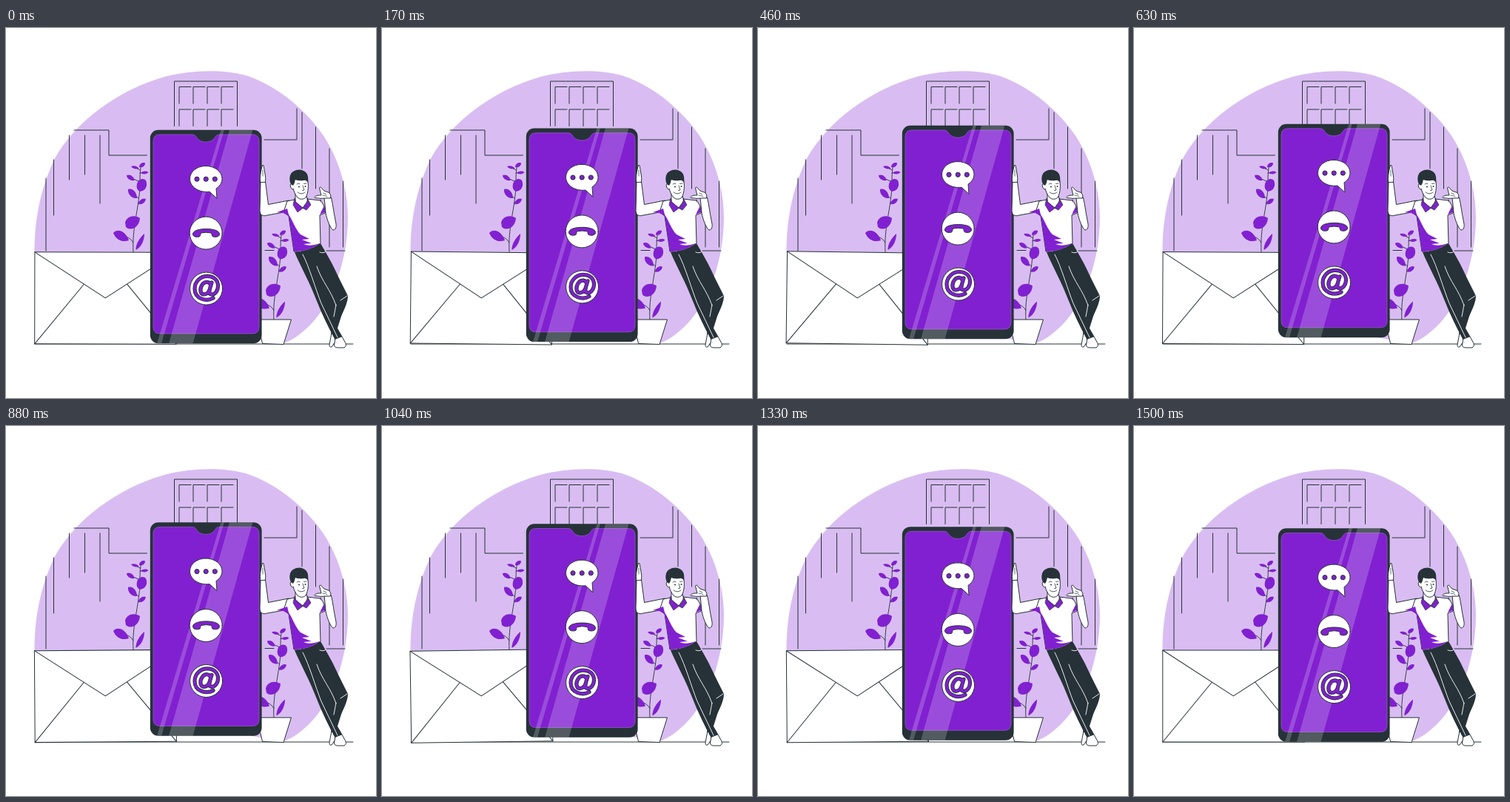
Recreate the animation shown at these times as an HTML page. Size 500x500 px, loop 1540 ms.

```html
<!DOCTYPE html>
<html lang="en">
<head>
<meta charset="utf-8">
<title>Contact us</title>
<style>
  html, body { margin: 0; width: 100%; height: 100%; overflow: hidden; background: #fff; }
  svg { display: block; width: 100vw; height: 100vh; }
  .ln { fill: none; stroke: #263238; stroke-linecap: round; stroke-linejoin: round; }
  .wh { fill: #fff; stroke: #263238; stroke-linecap: round; stroke-linejoin: round; }
  .pu { fill: #8120d0; }
  .pl { fill: #8120d0; stroke: #263238; stroke-linejoin: round; }
  .dk { fill: #263238; }
  .cr { fill: none; stroke: #fff; stroke-width: .9; stroke-linecap: round; }
</style>
</head>
<body>
<svg viewBox="0 0 500 500">
  <defs>
    <clipPath id="body"><rect x="194.8" y="138.3" width="150.8" height="288.5" rx="11"/></clipPath>
    <g id="plant">
      <path class="ln" d="M172 303C171 285 173 272 175 259C178 240 181 225 181 210C181 200 181 192 183 184M172 290Q169 284 160 281M174 262L171 262M179 236L184 233M179 230L171 223M181 217L184 211M181 208L168 202M181 196L190 195M181 192L174 188" stroke-width=".9"/>
      <path class="pu" d="M145 277C150 271 161 273 166 287C158 290 149 287 145 277ZM161 263C163 254 174 252 181 257C180 270 168 275 162 269ZM175.500 300C175 292 181 283 187 278C187 287 183 296 175.500 300ZM177 211C178 204 186 202 189 206C192 213 189 220 181 221C177 219 176 215 177 211ZM165 218C170 216 177 221 177 230C170 231 164 224 165 218ZM163 199C168 197 173 201 173.500 206C168 207 163 203 163 199ZM169 187C173 185 178 187 179.500 190C175 191 171 190 169 187ZM180 188C180 184 184 181 188 182.500C188 187 184 189 180 188ZM182 196C185 193 190 193 192.500 195C190 198 185 198 182 196ZM179 238C180 232 185 229 189 231C188 236 184 239 179 238Z"/>
    </g>
    <path id="at" d="M280 365.500C271 370.500 255 367 255 353C255 343 263 336 272 336C281 336 286.500 341.500 286.500 349C286.500 356 282 361 277.500 360.500C273.500 360 275 355 276 351L278 344.500M276.700 349C276 342.500 269 342.500 265.500 347C261 353 262.500 360.500 267.500 360.500C272 360.500 275 356 276 351" fill="none" stroke-linecap="round" stroke-linejoin="round"/>
  </defs>

  <path fill="#d9bdf2" d="M38.500 303C38.500 265 44 224 65 178C92 128 150 84 214 66C246 57 292 55 324 64C370 79 408 114 430 147C451 180 462 220 462 255C462 312 443 366 415 397C402 411 388 423 371 427L344 421L230 400L60 360Z"/>
  <g id="city" class="ln" stroke-width="1"></g>
  <path class="ln" d="M39 427H469" stroke-width="1"/>

  <use href="#plant"/>
  <use href="#plant" x="190" y="91.500"/>
  <path class="wh" d="M339 394H385.500L375 427.500L347 426.500Z"/>

  <g id="mail" class="wh" stroke-width="1">
    <rect x="38.800" y="303" width="191.200" height="124"/>
    <path fill="none" d="M38.800 303L134.300 364.800L230 303M38.800 427L105.300 346.300M230 427L163.800 346.300"/>
  </g>

  <g id="phone">
    <rect class="dk" x="194.800" y="138.300" width="150.800" height="288.500" rx="11"/>
    <path class="pu" stroke="#a766de" stroke-width=".6" d="M208 144.500H251C255 144.500 256 146 258 149C261 153 265 154.500 270 154.500C275 154.500 279 153 282 149C284 146 285 144.500 289 144.500H333Q342 144.500 342 153.500V404.500Q342 413.500 333 413.500H208Q199 413.500 199 404.500V153.500Q199 144.500 208 144.500Z"/>
    <g clip-path="url(#body)" fill="#fff" fill-opacity=".2">
      <path d="M302 138H333.500L252.500 427H220ZM290.500 138H295L210 427H204Z"/>
    </g>
    <path class="wh" d="M270 187C282 187 292 194.500 292 204.300C292 210 288.500 214.500 284 217.500L285 230.800L275 221.700C260 223.500 248.500 214.500 248.500 204.500C248.500 194.500 258 187 270 187Z"/>
    <g class="pl"><circle cx="258" cy="204.700" r="3.100"/><circle cx="270.200" cy="204.700" r="3.100"/><circle cx="282.300" cy="204.700" r="3.100"/></g>
    <circle class="wh" cx="270.200" cy="277.600" r="22"/>
    <path class="pl" d="M252.500 279.500C252 274 262 272 270.500 272S289 274 288.500 279.500C288 283.500 281 283.500 279 282C277.500 280.500 279 278.500 277 277.500Q270.500 276 264 277.500C262 278.500 263.500 280.500 262 282C260 283.500 253 283.500 252.500 279.500Z"/>
    <circle class="wh" cx="270.600" cy="352.600" r="22"/>
    <use href="#at" stroke="#263238" stroke-width="5.200"/>
    <use href="#at" stroke="#8120d0" stroke-width="3.400"/>
  </g>

  <g id="man" stroke-width="1">
    <path class="wh" d="M440 412L437 428Q437 432 440 431L445 424L447 413Z"/>
    <path class="wh" d="M445 419L443.500 429Q444 432 449 432H457Q461 430 459 426L454 417Z"/>
    <path class="dk" d="M390 303L425 291C434 306 443 322 449 336L462 362C462 372 455 385 450 395L447 404L454.500 417L444.500 421C436 405 427 387 420 369C411 345 399 324 390 303Z"/>
    <path class="dk" d="M446 377L461 364L446 412L439 414Z"/>
    <path class="cr" d="M401 306C410 323 418 352 426 372L448 418M420 322C427 343 439 354 446 375M446 374L443 390M424 303Q430 305 432 302M461 362L452 368"/>

    <path class="wh" d="M382 233L354.500 238.500L350.500 207.500L344 207.500L343 246C343 253 347 255 353 253L381 248Z"/>
    <path class="wh" d="M343.500 208C343 202 344 196 345 191L346.500 185.500Q348 184 348.500 188L350 197Q351.500 203 350.500 208Z"/>
    <path class="ln" d="M347 192V200" stroke-width=".7"/>
    <path class="wh" d="M425 232L432 250C434 260 438 270 442 273C446 273 447 268 445.500 262C443 250 442 240 439.500 229L430 229L432 249"/>
    <path class="wh" d="M417 228.500Q419 225.500 426 226L423.500 216Q425 213.500 427.500 217.500L430 220L437 222.500Q440 226 438.500 230L432 230Q425 231 418 229.500Z"/>
    <path class="ln" d="M428 226Q432 226 434 228M429 223L433 225" stroke-width=".7"/>

    <path class="wh" d="M390 232L380 234L375 249L382 254L389 302Q406 304 425 291L424 253L431 250C431 243 429 236 424 233L407 231Z"/>
    <path class="pu" d="M366 249L380 244L382 252C388 261 391 272 398 279L410 285L400 286L413 291L402 292Q410 296 424 291Q407 303 389 302L382 254L375 250Z"/>
    <path class="pu" d="M424 252L431 249L430 240Z"/>
    <path class="wh" d="M391 224L391 235L401 243L408 233L406 227Z"/>
    <path class="pl" d="M390 230L388 239L394 249L401 243.500L391.500 235ZM407 230L412 239L406 246L401 243.500L407 236Z" stroke-width=".7"/>
    <path class="wh" d="M387 204C386 214 389 223 394 229C397 232 402 232 405 229C409 222 409 212 407.500 204Z"/>
    <path class="wh" d="M388 211Q383 209 384.500 215Q386 219 389 218"/>
    <path class="dk" d="M385 211C382 205 383 197 388 194C394 190 402 191 406 196C409 200 408.500 206 407.500 209Q406 205 402 206Q395 207 391 205Q390 210 388 213Z"/>
    <path class="ln" d="M393 211Q395 209 397 210.500M402.500 210.500L406 210M401 213L403 219L400.500 219.500M394 222Q399 226 404 222" stroke-width=".8"/>
    <circle class="dk" cx="396" cy="214.500" r="1"/><circle class="dk" cx="404.500" cy="214" r="1"/>
  </g>
</svg>
<script>
  const el = id => document.getElementById(id);
  const LOOP = 1540, STEPS = 37, RISE = 10, TILT = 1, LEAD = 40 / 1500;

  function drawCity() {
    let d = 'M92 138H139V172H190.5M227.500 132.500V72H312.500V132.500M349 151H393V109M350 300.500H362M433 301H458';
    const walls = [[54, 203, 301], [64.500, 178, 253], [85.500, 145, 205], [106.500, 145, 198], [127, 145, 237],
                   [400, 114, 190], [418.500, 134, 217], [437, 163, 296], [455.500, 207, 296]];
    for (const [x, top, end] of walls) d += `M${x} ${top}V${end}`;
    for (const [top, end] of [[79.500, 102], [110, 132.500]])
      for (let i = 0; i < 4; i++) d += `M${234 + 19 * i} ${end}V${top}h16`;
    const path = document.createElementNS('http://www.w3.org/2000/svg', 'path');
    path.setAttribute('d', d);
    el('city').append(path);
  }

  // Triangle wave from 0 through 1, 0, -1 and back
  const swing = p => p < .25 ? 4 * p : p < .75 ? 2 - 4 * p : 4 * p - 4;

  function draw(ms) {
    const step = Math.floor(((ms % LOOP) + 2) * STEPS / LOOP) % STEPS;
    const p = (step / STEPS + LEAD) % 1;
    const lift = RISE * (1 - Math.abs(2 * p - 1));
    el('phone').setAttribute('transform', `translate(0 ${-lift})`);
    el('mail').setAttribute('transform', `rotate(${TILT * swing(p)} 134.400 365)`);
  }

  drawCity();
  const start = performance.now();
  function tick(now) {
    draw(Math.max(0, now - start));
    requestAnimationFrame(tick);
  }
  draw(0);
  requestAnimationFrame(tick);
</script>
</body>
</html>
```
